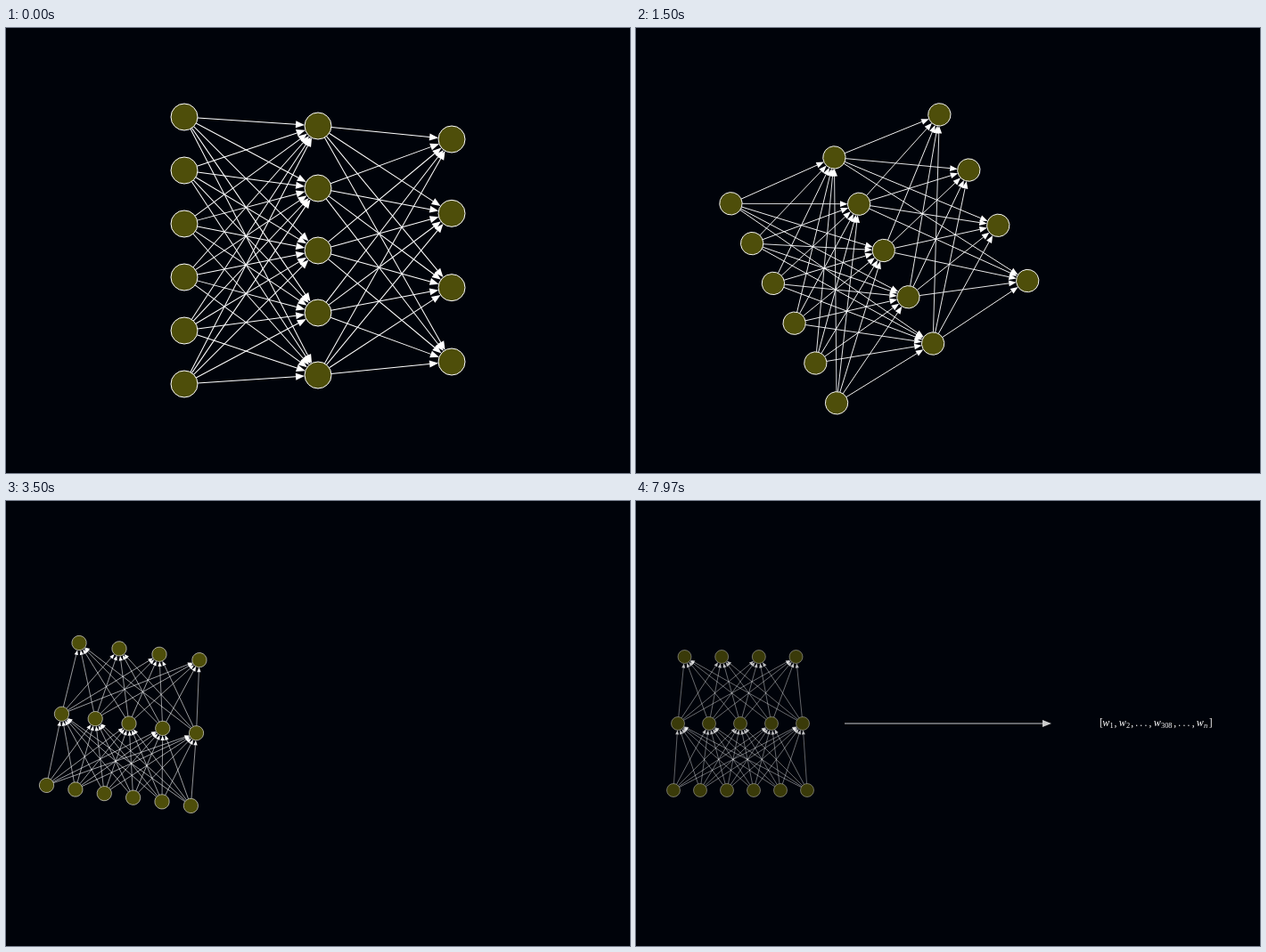
An HTML page with a canvas that plays this animation: 700x500 px, repeating every 8000 ms.

```html
<!DOCTYPE html>
<html lang="en">
<head>
<meta charset="utf-8">
<title>Network to weight vector</title>
<style>
  html, body { margin: 0; width: 100%; height: 100%; overflow: hidden; background: #00030a; }
  canvas { display: block; }
</style>
</head>
<body>
<canvas id="stage" width="700" height="500"></canvas>
<script>
const ctx = document.getElementById('stage').getContext('2d');
const LOOP = 8000;
const FPS = 30;
const MOVE_START = 14, ARROW_START = 113, FADE_START = 213; // in ticks of 1/30 s
const RADIUS = 15;
const HEAD_LENGTH = 10, HEAD_HALF = 4;

// Layers are centred on the origin.
const column = (x, count, height) => Array.from({ length: count }, (_, i) =>
  ({ x, y: height * (i / (count - 1) - 0.5) }));
const layers = [column(-150, 6, 300), column(0, 5, 280), column(150, 4, 250)];

const clamp = v => Math.min(1, Math.max(0, v));
const mix = (a, b, p) => a + (b - a) * p;

function drawArrow(x1, y1, x2, y2) {
  const length = Math.hypot(x2 - x1, y2 - y1);
  const base = length - HEAD_LENGTH;
  ctx.save();
  ctx.translate(x1, y1);
  ctx.rotate(Math.atan2(y2 - y1, x2 - x1));
  ctx.beginPath();
  ctx.moveTo(0, 0);
  ctx.lineTo(base, 0);
  ctx.stroke();
  ctx.beginPath();
  ctx.moveTo(length, 0);
  ctx.lineTo(base, -HEAD_HALF);
  ctx.lineTo(base, HEAD_HALF);
  ctx.fill();
  ctx.restore();
}

function drawEdge(a, b) {
  const length = Math.hypot(b.x - a.x, b.y - a.y);
  const dx = (b.x - a.x) / length * RADIUS;
  const dy = (b.y - a.y) / length * RADIUS;
  drawArrow(a.x + dx, a.y + dy, b.x - dx, b.y - dy);
}

function drawNetwork(p, alpha) {
  const scale = mix(1, 0.5, p);
  ctx.save();
  ctx.globalAlpha = alpha;
  ctx.translate(mix(350, 117, p), 250);
  ctx.rotate(-p * Math.PI / 2);
  ctx.scale(scale, scale);
  ctx.lineWidth = 1;
  ctx.strokeStyle = ctx.fillStyle = '#fff';
  for (let i = 0; i < layers.length - 1; i++)
    for (const a of layers[i])
      for (const b of layers[i + 1]) drawEdge(a, b);
  ctx.fillStyle = '#4e4e0a';
  for (const node of layers.flat()) {
    ctx.beginPath();
    ctx.arc(node.x, node.y, RADIUS, 0, Math.PI * 2);
    ctx.fill();
    ctx.stroke();
  }
  ctx.restore();
}

function drawLongArrow(alpha) {
  ctx.save();
  ctx.globalAlpha = alpha;
  ctx.lineWidth = 1.2;
  ctx.strokeStyle = ctx.fillStyle = '#ccc';
  drawArrow(234, 250, 466, 250);
  ctx.restore();
}

// Typesets the vector with the spacing of a math formula.
function drawVector() {
  const em = 11.5, baseline = 253;
  let x = 520;
  const put = (text, advance, style = '', size = em, drop = 0) => {
    ctx.font = `${style} ${size}px "Liberation Serif", serif`;
    ctx.fillText(text, x, baseline + drop);
    x += advance * em;
  };
  const weight = (index, advance, style) => {
    put('w', 0.716, 'italic', 12);
    put(index, advance, style, 8.4, 2);
  };
  const comma = () => put(',', 0.445);
  const dots = () => { for (let i = 0; i < 3; i++) put('.', 0.445); };

  ctx.fillStyle = '#fff';
  put('[', 0.278);
  weight('1', 0.45); comma();
  weight('2', 0.45); comma();
  dots(); comma();
  weight('308', 1.24); comma();
  dots(); comma();
  weight('n', 0.49, 'italic');
  put(']', 0.278);
}

function draw(now) {
  const time = Math.floor(now % LOOP / 10) * 10;
  const tick = Math.floor(time * FPS / 1000);
  const progress = start => clamp((tick - start) / 100);

  ctx.fillStyle = '#00030a';
  ctx.fillRect(0, 0, 700, 500);
  drawNetwork(progress(MOVE_START), 1 - progress(FADE_START));
  drawLongArrow(progress(ARROW_START));
  if (tick > FADE_START) drawVector();
}

const start = performance.now();
function loop() {
  draw(performance.now() - start);
  requestAnimationFrame(loop);
}
loop();
</script>
</body>
</html>
```
